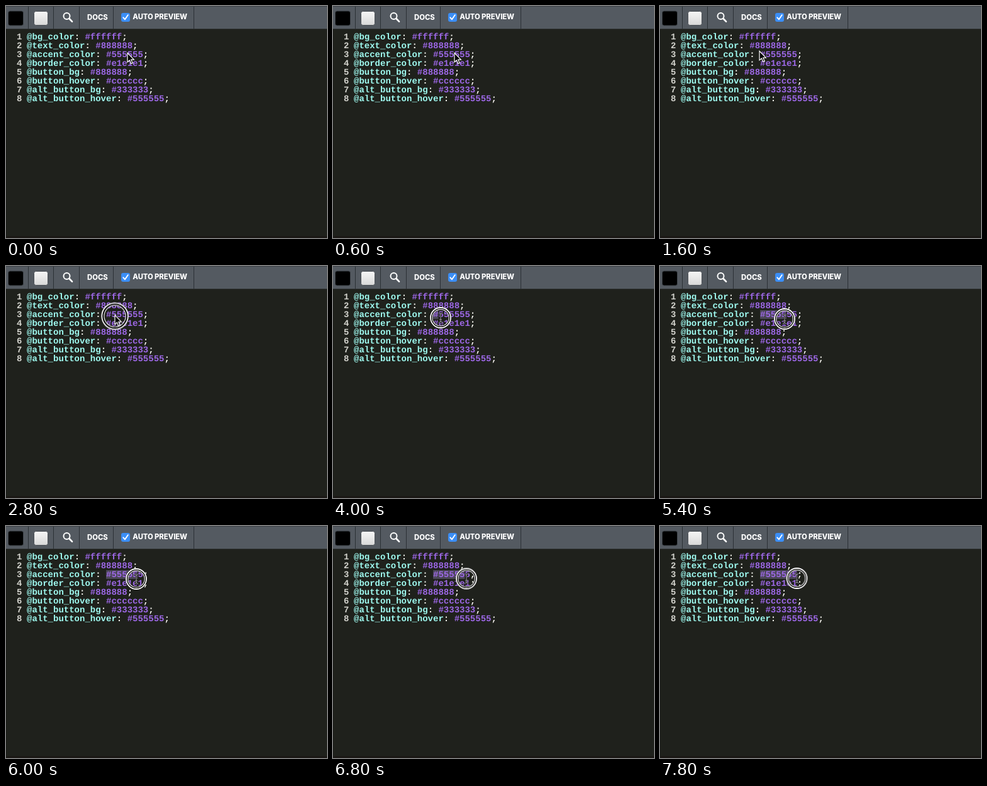
An HTML page for the animation above (8 s loop, 510 by 368 pixels).

```html
<!DOCTYPE html>
<html lang="en">
<head>
<meta charset="utf-8">
<title>Editing colour variables</title>
<style>
html, body { margin: 0; width: 100%; height: 100%; overflow: hidden; background: #1f211c; }
svg { display: block; width: 510px; height: 368px; }
.code { font: bold 14px "Liberation Mono", monospace; text-rendering: geometricPrecision; white-space: pre; fill: #fafaf4; }
.num { fill: #d2d2cc; }
.key { fill: #9ffaf0; }
.val { fill: #9d68e6; }
.label { font: 800 11.3px Inter, sans-serif; fill: #fff; }
.seps { stroke: #2b3035; }

/* One step lasts 200 ms = 2.5 % of the loop. */
.pointer { animation: move 8s infinite; }
.arrow { animation: arrow 8s step-end infinite; }
.beam { animation: beam 8s step-end infinite; }
.ring { animation: press 8s step-end infinite; }
.ring circle { fill: none; vector-effect: non-scaling-stroke; }
.sel { fill: #4a4656; transform-origin: 159px 0; animation: select 8s step-end infinite; }

@keyframes move {
  0% { transform: translate(193px, 76px); animation-timing-function: step-end; }
  12.5% { transform: translate(176px, 74px); animation-timing-function: step-end; }
  15%, 20% { transform: translate(158px, 73px); animation-timing-function: steps(4); }
  30%, 35% { transform: translate(173px, 79.5px); animation-timing-function: steps(2); }
  40%, 45% { transform: translate(163px, 82px); animation-timing-function: step-end; }
  47.5% { transform: translate(166px, 82px); animation-timing-function: step-end; }
  50% { transform: translate(171px, 82px); animation-timing-function: steps(4); }
  60% { transform: translate(178px, 83px); animation-timing-function: steps(3); }
  67.5% { transform: translate(198px, 84px); animation-timing-function: steps(3); }
  75% { transform: translate(207px, 84px); animation-timing-function: steps(4); }
  85% { transform: translate(212px, 83.5px); animation-timing-function: steps(2); }
  90% { transform: translate(214.5px, 83px); animation-timing-function: steps(3); }
  97.5%, 100% { transform: translate(217.5px, 83px); animation-timing-function: step-end; }
}
@keyframes arrow { 0% { opacity: 1; } 37.5%, 100% { opacity: 0; } }
@keyframes beam { 0% { opacity: 0; } 37.5%, 100% { opacity: 1; } }
@keyframes press {
  0% { opacity: 0; transform: scale(1.3); }
  35% { opacity: 1; transform: scale(1.3); }
  37.5% { opacity: 1; transform: scale(1.15); }
  40%, 100% { opacity: 1; transform: scale(1); }
}
@keyframes select {
  0% { transform: scaleX(0); }
  47.5% { transform: scaleX(1); }
  52.5% { transform: scaleX(2); }
  62.5% { transform: scaleX(3); }
  65% { transform: scaleX(4); }
  67.5% { transform: scaleX(5); }
  75% { transform: scaleX(6); }
  90%, 100% { transform: scaleX(7); }
}
</style>
</head>
<body>
<svg viewBox="0 0 510 368">
  <defs>
    <linearGradient id="pale" x2="0" y2="1">
      <stop stop-color="#f6f6f6"/><stop offset="1" stop-color="#d8d8d8"/>
    </linearGradient>
    <path id="ibeam" d="M-3 -7.5Q0 -7.5 0 -5.5V5.5Q0 7.5 -3 7.5M3 -7.5Q0 -7.5 0 -5.5M3 7.5Q0 7.5 0 5.5M-2 3H2"/>
  </defs>
  <rect width="510" height="368" fill="#1f211c"/>
  <rect y="365" width="510" height="3" fill="#1b1815"/>
  <rect y="36" width="1" height="332" fill="#171915"/>

  <rect width="510" height="36" fill="#545a61"/>
  <rect width="510" height="1" fill="#3a3f44"/>
  <rect y="36" width="510" height="1" fill="#2b2e2e"/>
  <path class="seps" d="M35.5 1V36M75.5 1V36M116.5 1V36M170.5 1V36M298.5 1V36"/>
  <rect x="3.5" y="8" width="24" height="23" rx="3" fill="#000" stroke="#3f444a"/>
  <rect x="44.5" y="8.5" width="22" height="22" rx="3" fill="url(#pale)" stroke="#4a4f55"/>
  <g fill="none" stroke="#fff" stroke-linecap="round">
    <circle cx="96.5" cy="16" r="5" stroke-width="2"/>
    <path d="M100.5 20L105 24.7" stroke-width="2.6"/>
  </g>
  <text class="label" x="129" y="22">DOCS</text>
  <rect x="183" y="11" width="14" height="14" rx="3" fill="#3b8ef6"/>
  <path d="M186.3 18.3L189 21.3L193.8 14.3" fill="none" stroke="#fff" stroke-width="1.9" stroke-linecap="round" stroke-linejoin="round"/>
  <text class="label" x="201.3" y="21" letter-spacing="-.08">AUTO PREVIEW</text>

  <rect class="sel" x="159" y="70" width="8.4" height="14"/>
  <g class="code" id="code"></g>

  <g class="pointer">
    <g class="ring">
      <circle r="14.8" stroke="#000" stroke-width="5"/>
      <circle r="16" stroke="#fff" stroke-width="1.8"/>
      <circle r="13.2" stroke="#eee" stroke-width="1.2"/>
    </g>
    <path class="arrow" d="M0 -1.5V13L3.4 10L5.8 15.5L8.2 14.4L5.8 9.2H10.3Z" fill="#000" stroke="#fff" stroke-width="1.2"/>
    <g class="beam" fill="none">
      <use href="#ibeam" stroke="#111" stroke-width="2.4"/>
      <use href="#ibeam" stroke="#a5a5a5"/>
    </g>
  </g>
</svg>
<script>
const vars = {
  bg_color: "ffffff", text_color: "888888", accent_color: "555555", border_color: "e1e1e1",
  button_bg: "888888", button_hover: "cccccc", alt_button_bg: "333333", alt_button_hover: "555555"
};
document.getElementById("code").innerHTML = Object.entries(vars).map(([name, hex], i) => {
  const y = 53 + 14 * i;
  return `<text class="num" x="17" y="${y}">${i + 1}</text>` +
    `<text x="33" y="${y}"><tspan class="key">@${name}</tspan>: <tspan class="val">#${hex}</tspan>;</text>`;
}).join("");
</script>
</body>
</html>
```
